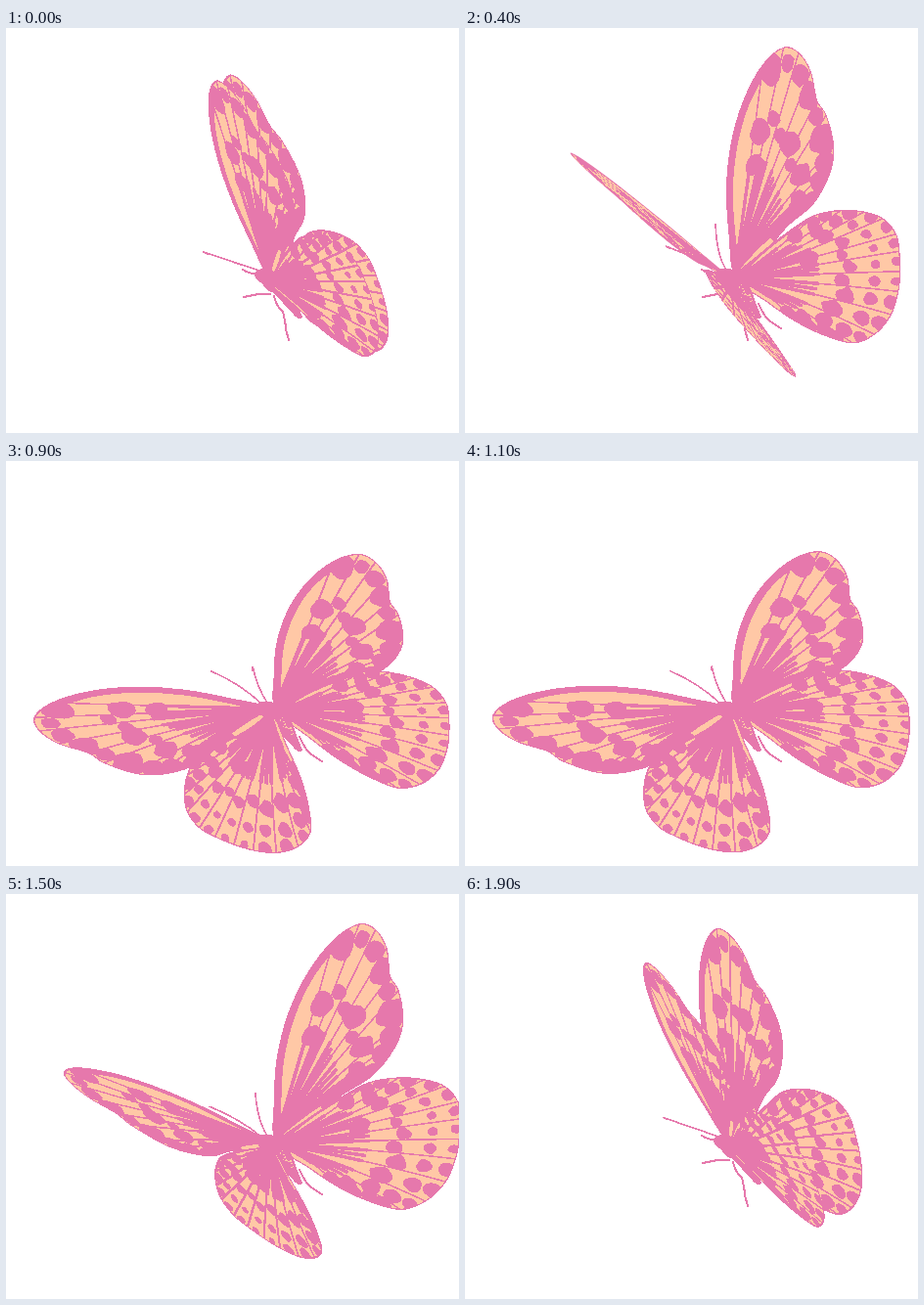
Animation of 463x414 px, one loop 2000 ms. Source, as an HTML page:

```html
<!DOCTYPE html>
<html lang="en">
<head>
<meta charset="utf-8">
<title>Butterfly</title>
<style>
html, body { margin: 0; width: 100%; height: 100%; overflow: hidden; background: #fff; }
svg { display: block; width: 463px; height: 414px; shape-rendering: crispEdges; }
.cell { fill: #ffc8a6; }
.ink { fill: #e678ac; }
.line { fill: none; stroke: #e678ac; stroke-linecap: round; stroke-linejoin: round; }
.vein { stroke-width: calc(var(--k) * 1.5px); }
.stem { stroke-width: calc(var(--k) * 3.4px); stroke-dasharray: .5 2; }
.rim { stroke-width: calc(var(--k) * 1.2px); }
</style>
</head>
<body>
<svg viewBox="0 0 463 414">
  <defs id="defs"></defs>
  <use id="foreR" href="#fore"/>
  <use id="hindR" href="#hind"/>
  <path class="line" stroke-width="2" d="M270 272L258 272L243 275M274 274Q276 284 283 290Q286 302 286 308L289 319M300 282Q307 298 315 302L323 307M242 247Q248 251 258 252"/>
  <path class="line" stroke-width="1.6" id="feelers"/>
  <path class="ink" d="M254 250Q262 244 275 247Q289 256 294 272Q299 286 303 295Q300 300 294 293Q283 281 274 271Q264 268 262 261Q254 258 254 250Z"/>
  <path class="cell" id="specks"/>
  <use id="hindL" href="#hind"/>
  <use id="foreL" href="#fore"/>
  <ellipse class="ink" cx="268" cy="255" rx="13" ry="8" transform="rotate(25 268 255)"/>
</svg>
<script>
const $ = id => document.getElementById(id);
const LOOP = 2000, STEP = 100;

let seed = 7;
const rand = () => (seed = seed * 16807 % 2147483647) / 2147483647;
const points = text => text.split(' ').map(p => p.split(',').map(Number));
const mix = (a, b, u) => a.map((v, j) => +(v + (b[j] - v) * u).toFixed(1));

// Smooth curve through a list of points
function curve(pts, closed) {
  const n = pts.length;
  const at = i => closed ? pts[(i + n) % n] : pts[Math.max(0, Math.min(n - 1, i))];
  let d = 'M' + pts[0];
  for (let i = 0; i < (closed ? n : n - 1); i++) {
    const [a, b, c, e] = [at(i - 1), at(i), at(i + 1), at(i + 2)];
    const p = b.map((v, j) => (v + (c[j] - a[j]) / 6).toFixed(1));
    const q = c.map((v, j) => (v - (e[j] - b[j]) / 6).toFixed(1));
    d += `C${p} ${q} ${c}`;
  }
  return d + (closed ? 'Z' : '');
}

// Uneven oval, long axis at the given tilt
function blob([x, y], rx, ry, tilt) {
  const pts = [], cos = Math.cos(tilt), sin = Math.sin(tilt);
  for (let i = 0; i < 9; i++) {
    const a = i / 9 * Math.PI * 2, r = .85 + rand() * .3;
    const u = Math.cos(a) * rx * r, v = Math.sin(a) * ry * r;
    pts.push([+(x + u * cos - v * sin).toFixed(1), +(y + u * sin + v * cos).toFixed(1)]);
  }
  return curve(pts, true);
}

// Veins fan out from the root to the rim; each cell between two veins carries spots
function defineWing(id, { edge, lead, hub, rings, band }) {
  const pts = points(edge), root = pts[0];
  const rim = curve(pts, true);
  const ends = pts.slice(lead, -1);
  let veins = '', stems = '', spots = blob(hub, 12, 9, -.6);
  const ray = (end, cls) => {
    const bend = mix(mix(root, end, .5), mix(root, hub, .7), .2);
    return `<path class="line ${cls}" pathLength="1" d="M${root}Q${bend} ${end}"/>`;
  };
  ends.forEach((end, i) => {
    veins += ray(end, 'vein');
    stems += ray(end, 'stem');
    if (!ends[i + 1]) return;
    const next = ends[i + 1], mid = mix(end, next, .5);
    const tilt = Math.atan2(mid[1] - root[1], mid[0] - root[0]);
    const width = Math.hypot(next[0] - end[0], next[1] - end[1]);
    if (i % 2) stems += ray(mid, 'stem');
    rings.forEach(([r, size], n) => {
      const spot = Math.min(width, 28) * size * (.85 + rand() * .3);
      spots += blob(mix(root, mid, r + (i % 2 ? .02 : -.02) * (n < 1)), spot * 1.3, spot, tilt);
    });
  });
  $('defs').innerHTML += `
    <clipPath id="${id}Clip"><path d="${rim}"/></clipPath>
    <g id="${id}">
      <path class="cell" d="${rim}"/>
      <g clip-path="url(#${id}Clip)">
        <path class="line" stroke-width="${band}" d="${curve(pts.slice(0, lead + 1))}"/>
        ${veins}${stems}
        <path class="ink" d="${spots}"/>
      </g>
      <path class="line rim" d="${rim}"/>
    </g>`;
}

defineWing('fore', {
  edge: '276,250 277,215 283,170 297,125 318,85 345,52 370,37 385,43 394,62 395,90 402,105 404,135 398,155 385,175 368,192 340,209 305,237',
  lead: 5, hub: [318, 148], rings: [[.67, .36], [.94, .42]], band: 13
});
defineWing('hind', {
  edge: '280,256 308,231 340,209 370,192 400,186 425,187 445,193 458,208 460,225 459,245 455,265 445,288 425,308 400,317 370,310 340,297 310,278',
  lead: 3, hub: [360, 238], rings: [[.67, .28], [.85, .24], [.98, .26]], band: 4
});

// Wings turn about the body: a point sits at mid + reach * (side * cos + lift * sin)
const SIDE = [166, -84];
const kinds = {
  fore: { lift: [22, -104], rest: [[276, 250], [370, 37], [404, 135]],
    pins: [{ mid: [-72, -96], reach: 1 }, { mid: [1, -20], reach: .82 }] },
  hind: { lift: [45, -77], rest: [[280, 256], [425, 187], [400, 317]],
    pins: [{ mid: [32, 11], reach: .7 }, { mid: [83, 94], reach: .25 }] }
};
const wings = [
  { id: 'foreR', kind: kinds.fore, root: [276, 250], dir: 1 },
  { id: 'hindR', kind: kinds.hind, root: [278, 256], dir: 1 },
  { id: 'foreL', kind: kinds.fore, root: [268, 253], dir: -1 },
  { id: 'hindL', kind: kinds.hind, root: [271, 260], dir: -1 }
];

// Wing angle in degrees at key times, joined smoothly round the loop
const flap = points('0,89 400,51 600,24 900,-13 1300,0 1500,28 1800,70 1900,79');
function angle(t) {
  const n = flap.length;
  const key = i => [flap[(i + n) % n][0] + Math.floor(i / n) * LOOP, flap[(i + n) % n][1]];
  let i = n - 1;
  while (flap[i][0] > t) i--;
  const [p, a, b, q] = [-1, 0, 1, 2].map(o => key(i + o));
  const span = b[0] - a[0], u = (t - a[0]) / span;
  const slope = (x, y) => (y[1] - x[1]) / (y[0] - x[0]) * span;
  const m = slope(p, b), k = slope(a, q), rise = b[1] - a[1];
  return a[1] + u * (m + u * (3 * rise - 2 * m - k + u * (m + k - 2 * rise)));
}

function place({ id, kind, root, dir }, cos, sin) {
  const [o, p, q] = kind.rest;
  const [v, w] = kind.pins.map(({ mid, reach }) =>
    mid.map((m, j) => m + reach * (dir * cos * SIDE[j] + sin * kind.lift[j])));
  const [x1, y1, x2, y2] = [p[0] - o[0], p[1] - o[1], q[0] - o[0], q[1] - o[1]];
  const det = x1 * y2 - x2 * y1;
  const row = j => [(v[j] * y2 - w[j] * y1) / det, (w[j] * x1 - v[j] * x2) / det];
  const [a, c] = row(0), [b, d] = row(1);
  const m = [a, b, c, d, root[0] - a * o[0] - c * o[1], root[1] - b * o[0] - d * o[1]];
  $(id).setAttribute('transform', `matrix(${m.map(n => n.toFixed(4))})`);
  const area = Math.min(1, Math.abs(a * d - b * c));
  $(id).style.setProperty('--k', (1 + 1.3 * (1 - area)).toFixed(2));
}

function draw(t) {
  const turn = angle(t) * Math.PI / 180;
  const cos = Math.cos(turn), sin = Math.sin(turn);
  for (const wing of wings) place(wing, cos, sin);
  const lx = 210 - 8 * sin * sin, ly = 214 + 15 * sin * sin;
  const rx = 253 + 4 * sin, ry = 208 - 10 * sin;
  $('feelers').setAttribute('d',
    `M262 249Q240 ${ly + 13} ${lx} ${ly}l4 2M267 247Q257 232 ${rx} ${ry}v4`);
}

let specks = '';
for (let i = 0; i < 16; i++) {
  const along = rand() * 16;
  specks += `M${(277 + along * .8 + rand() * 5).toFixed(1)} ${(261 + along + rand() * 3).toFixed(1)}h1.5v1.5h-1.5z`;
}
$('specks').setAttribute('d', specks);

function tick(now) {
  draw(Math.floor(now % LOOP / STEP) * STEP);
  requestAnimationFrame(tick);
}
draw(0);
requestAnimationFrame(tick);
</script>
</body>
</html>
```
